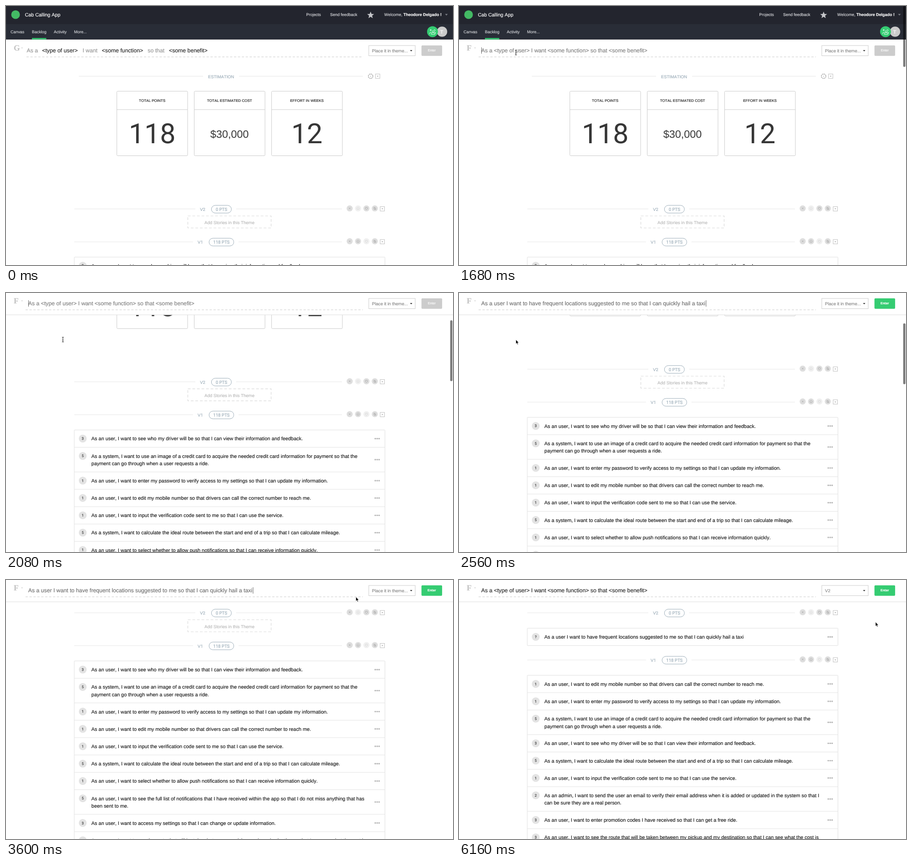
These frames come from a looping animation (982x570 px, 7200 ms). An HTML page:

```html
<!DOCTYPE html>
<html lang="en">
<head>
<meta charset="utf-8">
<title>Backlog</title>
<style>
  html, body { margin: 0; width: 100%; height: 100%; overflow: hidden; background: #fff; }
  svg { display: block; width: 982px; height: 570px; }
  text {
    font-family: "Liberation Sans", Arial, sans-serif;
    font-kerning: none;
    text-rendering: geometricPrecision;
    white-space: pre;
  }
  .serif { font-family: "Liberation Serif", "Times New Roman", serif; font-weight: 700; }
  .figure { font-family: Roboto, Arial, sans-serif; }
</style>
</head>
<body>
<svg id="stage" viewBox="0 0 982 570"></svg>
<script>
const LOOP = 7200, STEP = 80;
const GREEN = '#35cc72', BLUE = '#9cadb9', DARK = '#1f1f1f';
const stage = document.getElementById('stage');

function add(parent, tag, attrs = {}, content) {
  const node = document.createElementNS('http://www.w3.org/2000/svg', tag);
  for (const k in attrs) node.setAttribute(k, attrs[k]);
  if (content !== undefined) node.textContent = content;
  parent.appendChild(node);
  return node;
}
const group = (p, attrs) => add(p, 'g', attrs);
const rect = (p, x, y, width, height, fill, more) =>
  add(p, 'rect', { x, y, width, height, fill, ...more });
const circle = (p, cx, cy, r, fill) => add(p, 'circle', { cx, cy, r, fill });
const path = (p, d, fill, more) => add(p, 'path', { d, fill, ...more });
const line = (p, x1, x2, y, stroke, more) =>
  add(p, 'line', { x1, x2, y1: y, y2: y, stroke, ...more });
// a hairline outline gives small text its heavier rendering
const label = (p, x, y, size, fill, str, more) =>
  add(p, 'text', { x, y, 'font-size': size, fill, stroke: fill, 'stroke-width': size < 20 ? 0.18 : 0, ...more }, str);
const centred = { 'text-anchor': 'middle' };
const figure = { ...centred, class: 'figure' };
const bold = { 'font-weight': 700 };

// ---- header ----
const page = group(stage);

function header(p) {
  rect(p, 0, 0, 982, 40, '#23252e');
  rect(p, 0, 40, 982, 33.5, '#292d37');
  rect(p, 0, 72.5, 982, 1, '#1d1f27');
  circle(p, 21, 19, 9.5, '#43b964');
  label(p, 41.5, 22.9, 10.8, '#fff', 'Cab Calling App');
  const top = '#dcdde0';
  label(p, 659.5, 22, 8.95, top, 'Projects');
  label(p, 712, 22, 8.95, top, 'Send feedback');
  let star = '';
  for (let i = 0; i < 10; i++) {
    const r = i % 2 ? 3.4 : 8, a = i * Math.PI / 5;
    star += `${i ? 'L' : 'M'}${801 + r * Math.sin(a)} ${20.3 - r * Math.cos(a)}`;
  }
  path(p, star + 'Z', '#c6c7ca');
  label(p, 831, 22, 8.95, top, 'Welcome,');
  label(p, 873, 22, 8.95, '#fff', 'Theodore Delgado !', bold);
  path(p, 'M964.5 17.5h6l-3 3.6z', '#7d8087');
  [['Canvas', 10], ['Backlog', 57], ['Activity', 105], ['More...', 149.5]]
    .forEach(([s, x]) => label(p, x, 59.5, 8.95, '#d2d4d8', s));
  rect(p, 57, 70.5, 31.5, 3, GREEN);
  circle(p, 958, 56.5, 11.3, '#cbcbcb');
  label(p, 957.3, 60.5, 10.8, '#fff', 'T', centred);
  circle(p, 937, 56.5, 12, GREEN);
  const ink = { stroke: '#fff', 'stroke-width': 0.9 };
  path(p, 'M931 53h4M933 51v4M931 62v-2.4q0-1.6 2-1.6h1.5M934.5 62.3v-1.6q0-2 2-2h3.6q2 0 2 2v1.6z' +
    'M938.4 54a2 2 0 1 0 .01 0M940 52a1.7 1.7 0 1 1 1.6 3.4M942 58h1.3v2.6', 'none', ink);
}

// ---- estimation ----
function expander(p, x, y) {
  rect(p, x, y, 9.6, 9.6, '#fff', { stroke: '#b9b9b9', 'stroke-width': 0.9 });
  path(p, `M${x + 3} ${y + 4}h3.6l-1.8 2z`, '#999');
}

function estimation(p) {
  line(p, 160, 433, 154.5, '#e6e6e6');
  line(p, 512, 784, 154.5, '#e6e6e6');
  label(p, 472.5, 158.9, 9.35, BLUE, 'ESTIMATION', centred);
  add(p, 'circle', { cx: 801, cy: 154.6, r: 5.2, fill: 'none', stroke: '#aaa', 'stroke-width': 1.3, 'stroke-dasharray': '2.6 1.48' });
  add(p, 'circle', { cx: 801, cy: 154.6, r: 4.5, fill: '#fff', stroke: '#aaa', 'stroke-width': 0.7 });
  circle(p, 801, 154.6, 0.9, '#aaa');
  expander(p, 811.7, 149.7);
  const cards = [
    ['TOTAL POINTS', '118', 61, 302.4, figure],
    ['TOTAL ESTIMATED COST', '$30,000', 23.4, 289.6, centred],
    ['EFFORT IN WEEKS', '12', 61, 302.4, figure]
  ];
  cards.forEach(([title, value, size, y, style], i) => {
    const x = 243.5 + i * 170;
    rect(p, x, 187.5, 155.5, 142, '#fff', { rx: 2, stroke: '#cbcbcb' });
    line(p, x, x + 155.5, 228, '#cbcbcb');
    label(p, x + 77.6, 211.2, 8.05, '#222', title, centred);
    label(p, x + 77.6, y, size, '#363636', value, style);
  });
}

// ---- themes and stories ----
function theme(p, y, name, points, wide, pale) {
  const d = wide ? 5.2 : 0;
  line(p, 150, 416 - d, y - 0.5, '#e6e6e6');
  line(p, 505.5 + d, 738, y - 0.5, '#e6e6e6');
  label(p, 426.3 - d, y + 3.6, 9.35, BLUE, name[0]);
  label(p, 432.6 - d, y + 3.6, 9.35, BLUE, name[1], { class: 'figure' });
  rect(p, 451.3 - d, y - 8.5, 43.9 + 2 * d, 17, '#fff', { rx: 8.5, stroke: BLUE });
  label(p, 473.3, y + 3.6, 9.6, BLUE, points, figure);
  const glyphs = [
    'M-2-2L2 2M2-2L-2 2',
    'M-3-.5L0-3 3-.5M-2-.5v2.7h4v-2.7',
    'M-3 .5L0 3 3 .5M-2 .5v-2.7h4v2.7',
    'M-2.6-3L2.8 3M-1.8 2v-3a2 2 0 0 1 3.8 0v3zM-.5 3h1'
  ];
  glyphs.forEach((shape, i) => {
    const g = group(p, { transform: `translate(${755 + i * 18.4} ${y - 1.8})`, opacity: i === pale ? 0.45 : 1 });
    circle(g, 0, 0, 6.7, '#dedede');
    path(g, shape, 'none', { stroke: '#a2a2a2', 'stroke-width': 0.8 });
  });
  expander(p, 822, y - 5.6);
}

function stories(p, top, rows) {
  const heights = rows.map(r => r[2] === undefined ? 38.2 : 54.2);
  const total = heights.reduce((a, b) => a + b, 0);
  rect(p, 150, top, 682.5, total, '#fff', { rx: 1, stroke: '#dfdfdf' });
  let y = top;
  rows.forEach(([pts, first, second], i) => {
    const h = heights[i];
    if (i) line(p, 150, 832.5, y, '#e3e3e3');
    circle(p, 168.6, y + 19, 8.6, '#e3e3e3');
    label(p, 168.6, y + 21.8, 8, '#333', pts, figure);
    label(p, 187.6, y + 23, 10.91, DARK, first);
    if (second) label(p, 187.6, y + 39.4, 10.91, DARK, second);
    for (let k = 0; k < 3; k++) circle(p, 811.2 + k * 4.2, y + h / 2, 1.7, '#b5b5b5');
    y += h;
  });
}

const draft = 'As a user I want to have frequent locations suggested to me so that I can quickly hail a taxi';
const hint = 'As a <type of user> I want <some function> so that <some benefit>';
const want = 'As an user, I want to ';
const system = 'As a system, I want to ';
const S = {
  driver: [3, want + 'see who my driver will be so that I can view their information and feedback.'],
  card: [5, system + 'use an image of a credit card to acquire the needed credit card information for payment so that the',
    'payment can go through when a user requests a ride.'],
  password: [1, want + 'enter my password to verify access to my settings so that I can update my information.'],
  mobile: [1, want + 'edit my mobile number so that drivers can call the correct number to reach me.'],
  code: [1, want + 'input the verification code sent to me so that I can use the service.'],
  mileage: [5, system + 'calculate the ideal route between the start and end of a trip so that I can calculate mileage.'],
  push: [1, want + 'select whether to allow push notifications so that I can receive information quickly.'],
  notices: [5, want + 'see the full list of notifications that I have received within the app so that I do not miss anything that has',
    'been sent to me.'],
  settings: [3, want + 'access my settings so that I can change or update information.'],
  route: [3, want + 'see the route that will be taken between my pickup and my destination so that I can see what the cost is', ''],
  admin: [2, 'As an admin, I want to send the user an email to verify their email address when it is added or updated in the system so that I',
    'can be sure they are a real person.'],
  promo: [3, want + 'enter promotion codes I have received so that I can get a free ride.']
};

header(page);
estimation(page);
theme(page, 447.2, 'V2', '0 PTS', false, 1);

const before = group(page);
rect(before, 399.5, 462, 183, 26.5, 'none', { stroke: '#d9d9d9', 'stroke-width': 1.2, 'stroke-dasharray': '6 4' });
label(before, 491, 480.4, 9.6, '#b9b9b9', 'Add Stories in this Theme', centred);
theme(before, 519.6, 'V1', '118 PTS', true, 2);
stories(before, 552.6, [S.driver, S.card, S.password, S.mobile, S.code, S.mileage, S.push, S.notices, S.settings, S.route]);

const after = group(page);
stories(after, 480.6, [['?', draft]]);
theme(after, 551, 'V1', '118 PTS', true, 2);
stories(after, 584.2, [S.mobile, S.password, S.card, S.driver, S.mileage, S.code, S.admin, S.promo, S.route]);

// ---- story bar ----
const bar = group(stage);
rect(bar, 0, 0, 982, 48, '#fff');
const edge = line(bar, 0, 982, 48, '#dedede');
const letter = label(bar, 17, 22.8, 17.5, '#c4c4c4', 'G', { class: 'serif' });
path(bar, 'M33.5 16.6h3.4l-1.7 1.8z', '#c4c4c4');
const rule = line(bar, 43, 784, 37, '#c9c9c9', { 'stroke-dasharray': '5 3.6', 'stroke-width': 1.1 });

const guided = group(bar);
[['As a', 45.5], ['<type of user>', 79.3], ['I want', 168.3], ['<some function>', 210.6],
  ['so that', 311.3], ['<some benefit>', 358]]
  .forEach(([s, x]) => label(guided, x, 27.3, 12.27, s[0] === '<' ? '#2a2a2a' : '#949494', s));
const entry = label(bar, 48.8, 27.3, 12.28, '#808080', hint);
const caret = rect(bar, 49, 16, 1, 14, '#666');

rect(bar, 797, 12, 102, 22.5, '#fff', { stroke: '#cbcbcb' });
const choice = label(bar, 804, 27.2, 9.6, '#888', '');
path(bar, 'M887.6 22h5l-2.5 3z', '#333');
const button = rect(bar, 912.7, 11.7, 45.4, 23, '#ccc', { rx: 2 });
const enter = label(bar, 935.3, 25.4, 7.2, '#fff', 'Enter', centred);

// ---- scrollbar and pointer ----
const thumb = rect(stage, 975.8, 0, 5, 134, '#000', { rx: 2.5 });
const pointer = group(stage);
const arrow = path(pointer, 'M0 0V9.2L2.1 7.3 3.5 10.7 5 10 3.6 6.8H6.4Z', '#000', { stroke: '#fff', 'stroke-width': 0.6 });
const beam = path(pointer, 'M-2-5.5Q0-5.5 0-4.3Q0-5.5 2-5.5M0-4.5V4.5M-2 5.5Q0 5.5 0 4.3Q0 5.5 2 5.5M-1 1H1', 'none',
  { stroke: '#222', 'stroke-width': 1 });

// time, x, y of the pointer
const route = [
  [160, 470, 500], [720, 25, 93], [960, 25, 93], [1440, 125, 102.5], [2320, 125, 102.5],
  [2400, 125, 102.8], [2880, 125, 102.8], [3200, 440, 95], [3760, 850, 23], [3920, 850, 23],
  [4240, 930, 20], [4560, 930, 20], [4720, 915, 92.5], [LOOP, 915, 92.5]
];

function along(t) {
  let i = 0;
  while (i < route.length - 2 && t >= route[i + 1][0]) i++;
  const [t0, x0, y0] = route[i], [t1, x1, y1] = route[i + 1];
  const p = Math.min(1, Math.max(0, (t - t0) / (t1 - t0)));
  const e = p * p * (3 - 2 * p);
  return [x0 + (x1 - x0) * e, y0 + (y1 - y0) * e];
}

function easeOut(t, from, to, power) {
  const p = Math.min(1, Math.max(0, (t - from) / (to - from)));
  return 1 - Math.pow(1 - p, power);
}

const show = (node, on) => node.setAttribute('visibility', on ? 'visible' : 'hidden');

function paint(node, colour) {
  node.setAttribute('fill', colour);
  node.setAttribute('stroke', colour);
}

function draw(t) {
  const free = t >= 960, typed = t >= 2400 && t < 6160, added = t >= 6160;
  const scroll = 279 * easeOut(t, 1680, 2320, 2.35) + 95.5 * easeOut(t, 2560, 3120, 4.3);
  page.setAttribute('transform', `translate(0 ${-scroll})`);
  bar.setAttribute('transform', `translate(0 ${Math.max(0, 75 - scroll)})`);
  show(edge, scroll > 75);
  show(before, !added);
  show(after, added);

  letter.textContent = free ? 'F' : 'G';
  rule.setAttribute('x1', free ? 43 : 45);
  show(guided, !free);
  show(entry, free);
  entry.textContent = typed ? draft : hint;
  paint(entry, added ? '#2a2a2a' : typed ? '#707070' : '#808080');
  show(caret, t >= 1440 && t < 3760);
  caret.setAttribute('x', typed ? 542.3 : 49);

  choice.textContent = t >= 3920 ? 'V2' : 'Place it in theme...';
  const ready = t >= 2400;
  button.setAttribute('fill', ready ? GREEN : '#ccc');
  enter.setAttribute('font-weight', ready ? 700 : 400);

  const fade = t < 1600 ? 0 : Math.min(1, Math.max(0, (3360 - t) / 240));
  thumb.setAttribute('opacity', 0.51 * fade);
  thumb.setAttribute('y', scroll * 0.239);

  const [x, y] = along(t);
  const typing = t >= 1360 && t < 2400;
  pointer.setAttribute('transform', `translate(${x} ${y})`);
  show(arrow, t >= 160 && !typing);
  show(beam, typing);
}

const start = performance.now();
function tick() {
  const t = (performance.now() - start) % LOOP;
  draw(Math.floor(t / STEP) * STEP);
  requestAnimationFrame(tick);
}
tick();
</script>
</body>
</html>
```
